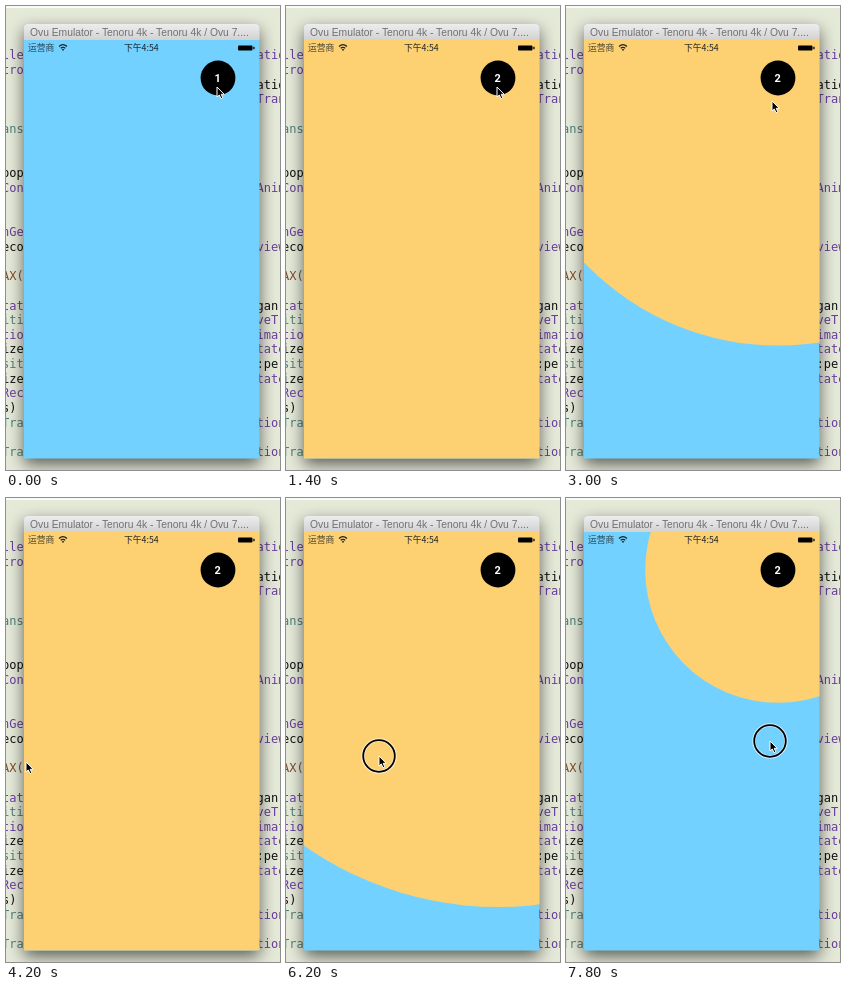
Recreate the animation shown at these times as an HTML page. Size 274 px wide and 464 px high, loop 8000 ms.

```html
<!DOCTYPE html>
<html lang="zh">
<head>
<meta charset="utf-8">
<style>
  html, body { margin: 0; width: 100%; height: 100%; overflow: hidden; background: #e5e9d8; }
  svg { display: block; width: 100%; height: 100%; }
  .code { font: 12px "DejaVu Sans Mono", monospace; white-space: pre; }
  .title { font: 10.3px "Liberation Sans", sans-serif; fill: #707070; }
  .status { font: 8.8px "Noto Sans CJK SC", "Noto Sans CJK", sans-serif; fill: #1a2228; }
  .label { font: bold 11px Roboto, sans-serif; fill: #fff; text-anchor: middle; }
  .window { filter: drop-shadow(0 6px 8px rgba(0, 0, 0, .6)); }
</style>
</head>
<body>
<svg viewBox="0 0 274 464">
  <defs>
    <linearGradient id="bar" x2="0" y2="1">
      <stop stop-color="#ededed"/><stop offset="1" stop-color="#d2d2d2"/>
    </linearGradient>
    <clipPath id="screen"><rect x="18" y="34" width="235.500" height="418.500"/></clipPath>
  </defs>
  <rect width="274" height="464" fill="#e5e9d8"/>
  <rect width="274" height="2" fill="#fafafa"/>
  <g id="code" class="code"></g>

  <path class="window" d="M18 452.500V22q0-4 4-4H249.500q4 0 4 4V452.500z" fill="#72d1ff"/>
  <path d="M18 34V22q0-4 4-4H249.500q4 0 4 4V34z" fill="url(#bar)"/>
  <text class="title" x="24" y="29.500">Ovu Emulator - Tenoru 4k - Tenoru 4k / Ovu 7....</text>

  <g clip-path="url(#screen)">
    <circle id="reveal" cx="212" cy="72" fill="#fdd172"/>
  </g>

  <g class="status">
    <text x="22" y="45" fill-opacity=".8">运营商</text>
    <text x="118" y="45">下午4:54</text>
    <g fill="none" stroke="#1a2228" stroke-width="1.200">
      <path d="M53 40.500q4-3.600 8 0M54.700 42.300q2.300-2 4.600 0"/>
    </g>
    <path d="M55.700 43.500q1.300-1 2.600 0L57 45z"/>
    <rect x="232" y="39.500" width="14.500" height="5" rx="1" fill="#000"/>
    <rect x="247.300" y="40.800" width="1.300" height="2.400" fill="#000"/>
  </g>

  <circle cx="212" cy="72" r="17.400"/>
  <text id="label" class="label" x="211.700" y="76">1</text>

  <g id="pointer">
    <g id="ring" fill="none">
      <circle r="16" stroke="#fff" stroke-opacity=".6" stroke-width="3.600"/>
      <circle r="15.800" stroke="#000" stroke-width="1.800"/>
    </g>
    <path d="M0 0V10L2.300 8 4 11.700 5.800 10.900 4.200 7.300H7.200z" stroke="#fff" stroke-width="1"/>
  </g>
</svg>
<script>
const LOOP = 8000, STEP = 200;
const SMALL = 18, LARGE = 475, SPEED = 0.914;   // radii in px, speed in px per ms
const EDGE = 18, DRAG_START = 5200, DRAG_RATIO = 1.84;
const $ = id => document.getElementById(id);

// [baseline, left text, right text, left colour, right colour]
const purple = '#6a3d9e', teal = '#4d7f78', brown = '#7d4a2a', black = '#111';
const lines = [
  [53, 'ller', 'ation', purple, purple], [68, 'trol', '', purple],
  [83, '', 'ation', '', black], [97, '', 'Tran', '', purple],
  [127, 'ans', '', teal], [171, 'pop:', '', black],
  [186, 'Cont', 'Anim', purple, purple], [230, 'nGes', '', purple],
  [245, 'ecog', 'view', black, purple], [274, 'AX((', '', brown],
  [304, 'tate', 'gan', purple, black], [318, 'itio', 'veTr', teal, purple],
  [333, 'tion', 'imat', purple, purple], [347, 'izer', 'tate', black, purple],
  [362, 'siti', ':per', teal, black], [377, 'izer', 'tate', black, purple],
  [391, 'Reco', '', purple], [406, 's) {', '', black],
  [421, 'Tran', 'tion', teal, purple], [450, 'Tran', 'tion', teal, purple]
];
const codeText = (x, y, text, fill) =>
  text ? `<text x="${x}" y="${y}" fill="${fill}">${text}</text>` : '';
$('code').innerHTML = lines.map(([y, left, right, leftFill, rightFill]) =>
  codeText(-4, y, left, leftFill) + codeText(250.5, y, right, rightFill)).join('');

// [time, x, y] of the pointer tip
const path = [
  [0, 211, 81], [2600, 211, 81], [2800, 210, 85], [3000, 206, 95],
  [3400, 145, 150], [3800, 60, 230], [4200, 20, 264], [5200, 20, 264],
  [5700, 140, 262], [6200, 93, 258], [6700, 30, 256], [7000, 64, 253],
  [7800, 204, 243], [8000, 204, 243]
];
function pointerAt(t) {
  const i = path.findIndex(p => p[0] > t);
  const a = path[i - 1], b = path[i], k = (t - a[0]) / (b[0] - a[0]);
  return [a[1] + (b[1] - a[1]) * k, a[2] + (b[2] - a[2]) * k];
}

const grow = dt => dt < 0 ? 0 : Math.min(LARGE, SMALL + SPEED * dt);
function shrink(dt) {
  const r = LARGE - SPEED * Math.max(0, dt);
  return r > SMALL ? r : 0;
}
function radiusAt(t, x) {
  if (t >= DRAG_START) return LARGE - DRAG_RATIO * (x - EDGE);
  if (t >= 2600) return grow(t - 2727);
  if (t >= 1385) return shrink(t - 1385);
  return grow(t - 31);
}

function draw(now) {
  const t = Math.floor(now % LOOP / STEP) * STEP;
  const [x, y] = pointerAt(t), r = radiusAt(t, x);
  $('reveal').setAttribute('r', r);
  $('label').textContent = r ? 2 : 1;
  $('pointer').setAttribute('transform', `translate(${x} ${y})`);
  $('ring').setAttribute('visibility', t >= DRAG_START ? 'visible' : 'hidden');
}
const start = performance.now();
function tick() {
  draw(performance.now() - start);
  requestAnimationFrame(tick);
}
tick();
</script>
</body>
</html>
```
